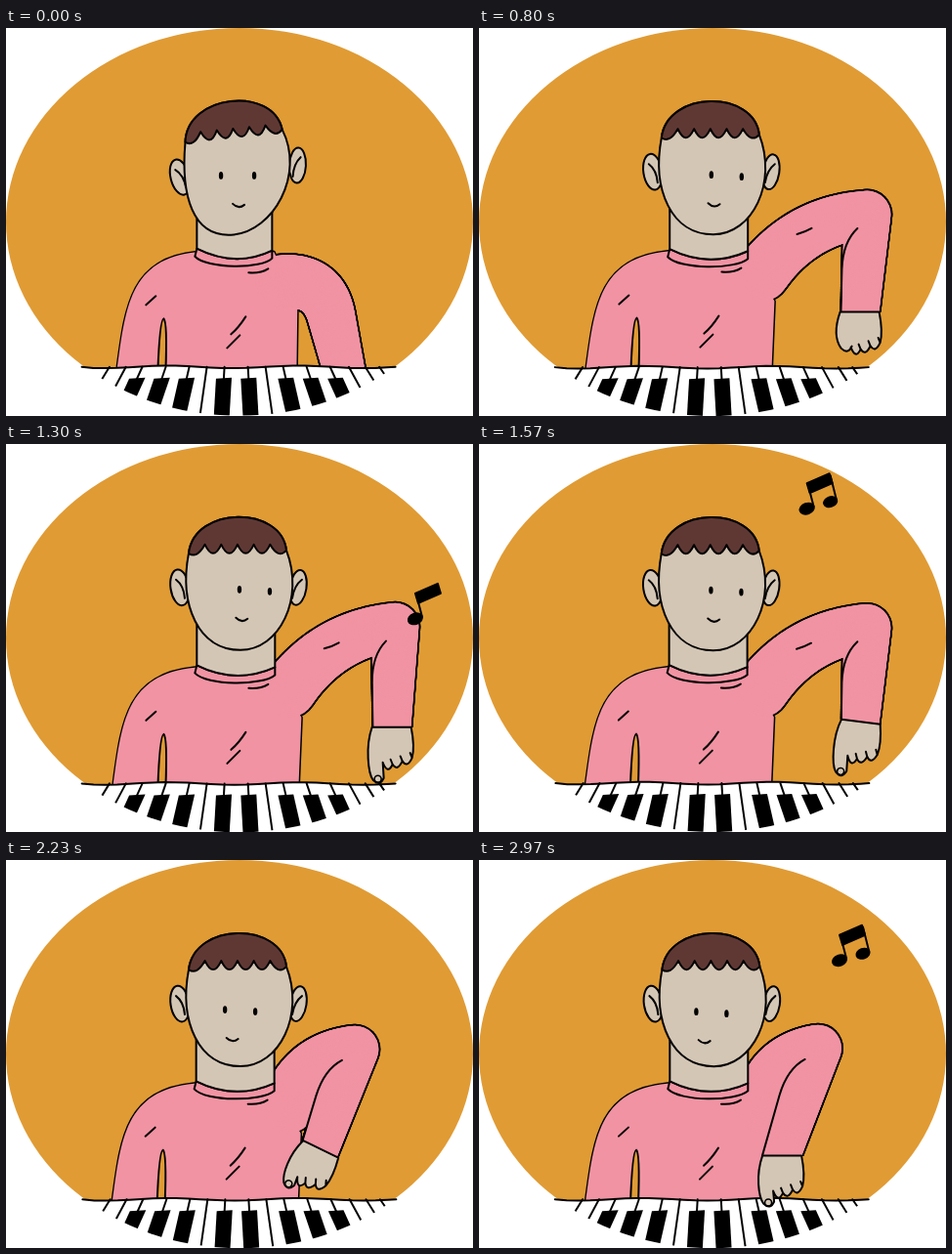
Write an HTML page with a canvas that moves like this. It is 478x397 px and loops after 3.01 s.

```html
<!DOCTYPE html>
<html lang="en">
<head>
<meta charset="utf-8">
<title>Piano player</title>
<style>
html, body { margin: 0; width: 100%; height: 100%; overflow: hidden; background: #fff; }
canvas { display: block; }
</style>
</head>
<body>
<canvas id="stage" width="478" height="397"></canvas>
<script>
const ctx = document.getElementById('stage').getContext('2d');
const LOOP = 3010, STEP = LOOP / 90;
const INK = '#000', PINK = '#f193a3', SKIN = '#d4c6b5', HAIR = '#5f3834', WALL = '#e09b34';

const mix = (a, b, k) => a + (b - a) * k;
const smooth = k => k * k * (3 - 2 * k);
const clamp = k => Math.max(0, Math.min(1, k));

// each pose is reached between the times from and to
const poses = [
  { from: 0, to: 0, elbow: [333, 296], wrist: [355, 390], turn: 0, reach: 0, look: [220, 151] },
  { from: 0, to: 330, elbow: [397, 198], wrist: [381, 294], turn: .1, reach: 0, look: [237, 149] },
  { from: 330, to: 600, elbow: [397, 191], wrist: [390, 291], turn: 0, reach: 0, look: [238, 150] },
  { from: 800, to: 1250, elbow: [398, 187], wrist: [395, 290], turn: 0, reach: 1, look: [239, 149] },
  { from: 1480, to: 1840, elbow: [395, 195], wrist: [369, 257], turn: .8, reach: 1, look: [231, 151] },
  { from: 1840, to: 2240, elbow: [357, 194], wrist: [321, 297], turn: .45, reach: .6, look: [224, 153] },
  { from: 2240, to: 2740, elbow: [347, 193], wrist: [310, 303], turn: 0, reach: .7, look: [222, 155] }
];

function poseAt(t) {
  const i = Math.max(1, poses.findLastIndex(p => p.from <= t));
  const a = poses[i - 1], b = poses[i], k = smooth(clamp((t - b.from) / (b.to - b.from)));
  const blend = (x, y) => Array.isArray(x) ? x.map((v, j) => mix(v, y[j], k)) : mix(x, y, k);
  return Object.fromEntries(Object.keys(a).map(key => [key, blend(a[key], b[key])]));
}

function shape(d, fill, line = 2) {
  const path = new Path2D(d);
  if (fill) { ctx.fillStyle = fill; ctx.fill(path); }
  if (line) { ctx.lineWidth = line; ctx.stroke(path); }
}

function oval(x, y, rx, ry, tilt, fill, line) {
  ctx.beginPath();
  ctx.ellipse(x, y, rx, ry, tilt, 0, 7);
  if (fill) { ctx.fillStyle = fill; ctx.fill(); }
  if (line) { ctx.lineWidth = line; ctx.stroke(); }
}

// draws one part with its own hand-drawn tremble
function part(seed, frame, paint) {
  ctx.save();
  ctx.translate(.4 * Math.sin(frame * 5 + seed), .4 * Math.sin(frame * 3 + seed * 2));
  paint();
  ctx.restore();
}

// a round limb that tapers from r0 to r1 along a curve
function limb(at, r0, r1, grow, color) {
  for (let i = 0; i <= 60; i++) oval(...at(i / 60), ...Array(2).fill(mix(r0, r1, i / 60) + grow), 0, color);
}

function drawBody({ elbow, wrist, turn }, t, k) {
  const sx = mix(283, 289, k), sy = mix(260, 252, k), [ex, ey] = elbow, [wx, wy] = wrist;
  const len = Math.hypot(ex - sx, ey - sy), bulge = 28;
  const cx = (sx + ex) / 2 + (ey - sy) / len * bulge, cy = (sy + ey) / 2 - (ex - sx) / len * bulge;
  const upper = s => [mix(mix(sx, cx, s), mix(cx, ex, s), s), mix(mix(sy, cy, s), mix(cy, ey, s), s)];
  const fore = s => [mix(ex, wx, s), mix(ey, wy, s)];

  function arm(grow, color) {
    limb(upper, 29, 25, grow, color);
    ctx.save();
    ctx.translate(wx, wy);
    ctx.rotate(turn);
    const cuff = new Path2D('M-400 -400H400V0H-400Z'), m = ctx.getTransform();
    ctx.clip(cuff);
    ctx.setTransform(m.translate(0, 0).rotate(-turn * 180 / Math.PI).translate(-wx, -wy));
    limb(fore, 25, 20, grow, color);
    ctx.restore();
  }

  const x = mix(4, 0, k);
  const torso = `M${193 + x / 2} 229C${122 + x} 236 ${118 + x} 285 ${109 + x} 352H${mix(297, 299, k)}L${mix(298, 302, k)} 280L274 229Z`;
  arm(1, INK);
  shape(torso, PINK, 3);
  shape(torso, PINK, 0);
  arm(-1, PINK);
  shape('M155 352Q157 298 161 297Q165 300 163 352', WALL);
  shape('M143 283L153 274M226 327L239 314M230 313Q238 306 245 295M248 250Q260 251 268 246');

  if (k < .5) return;
  // fold of the elbow and the inner edge of the forearm
  const fl = Math.hypot(wx - ex, wy - ey), dx = (wx - ex) / fl, dy = (wy - ey) / fl;
  const spot = (side, down) => `${ex - dy * side + dx * down} ${ey + dx * side + dy * down}`;
  const c = Math.cos(turn), s = Math.sin(turn);
  shape(`M${spot(9, 15)}Q${spot(23, 30)} ${spot(22, 58)}L${wx - 20 * c} ${wy - 20 * s}`);
  if (t < 2000) {
    const [mx, my] = upper(.5);
    shape(`M${mx - 11} ${my + 2}Q${mx - 3} ${my} ${mx + 4} ${my - 4}`);
  }
}

function drawNeck(k) {
  const r = mix(272, 275, k);
  shape(`M195 226Q235 246 ${r} 228V236C262 247 205 247 193 234Z`, PINK);
  shape(`M195 180V226Q235 246 ${r} 228V180`, SKIN);
}

function drawHead([lookX, lookY], k) {
  const chin = mix(227, 240, k);
  const top = '287 109C282 63 193 63 187 112';
  ctx.save();
  ctx.translate(235, 150);
  ctx.rotate(mix(-.1, 0, k));
  ctx.translate(-235, -150);
  oval(178, 147, 9.5, 18.5, -.15, SKIN, 2);
  oval(299, 147, 8.5, 18, .15, SKIN, 2);
  shape('M174 139Q182 145 183 158M303 139Q295 145 293 158');
  shape(`M${top}C177 165 ${chin - 43} 211 ${chin} 211C${chin + 40} 211 306 158 287 109Z`, SKIN);
  let fringe = 'M' + top;
  for (let i = 1; i <= 6; i++) {
    const x = 187 + i * 100 / 6;
    fringe += `Q${x - 8.3} ${i % 5 === 1 ? 118 : 121} ${x} ${i < 6 ? 103 : 109}`;
  }
  shape(fringe, HAIR);
  ctx.restore();

  oval(lookX, lookY, 2.2, 3.9, 0, INK);
  oval(lookX + mix(34, 31, k), lookY + 2 * k, 2.2, 3.9, 0, INK);
  const x = 86 + .65 * lookX + 9 * (1 - k), y = lookY + 30;
  shape(`M${x - 6} ${y - 1}Q${x} ${y + 5} ${x + 6} ${y}`);
}

function drawHand({ wrist, turn, reach }) {
  const tip = mix(40, 57, reach);
  let d = `M20 0H-20C-27 20 -24 ${tip - 10} -19 ${tip - 3}Q-12 ${tip + 4} -8 ${tip - 5}L-9 36`;
  for (const x of [-9, 1, 11]) d += `Q${x + 5} ${46 - x / 3} ${x + 10} ${35 - x / 3}l-2 -5l2 5`;
  ctx.save();
  ctx.translate(...wrist);
  ctx.rotate(turn);
  shape(d + 'Q24 20 20 0Z', SKIN);
  if (reach > .5) oval(-14, tip - 4, 3.5, 3.5, 0, null, 1.6);
  ctx.restore();
}

function clipStage() {
  ctx.beginPath();
  ctx.ellipse(239, 198.5, 239, 198.5, 0, 0, 7);
  ctx.clip();
}

function drawPiano() {
  let top = 'M78 347';
  for (let x = 90; x < 399; x += 12) top += `L${x} ${347 + 1.3 * Math.sin(x)}`;
  shape(top + 'L399 347V420H78Z', '#fff', 0);
  shape(top + 'L399 347');

  // keys stand in slots that fan out towards the viewer
  const fan = (slot, y, dx = 0) => {
    const x = 134 + 25.5 * slot;
    return `${236 + (x - 236) * (1 + .165 * (y - 360) / 37) + dx} ${y}`;
  };
  ctx.save();
  clipStage();
  for (const slot of [0, 1, 2, 3.5, 4.5, 6, 7, 8]) {
    shape(`M${fan(slot, 347)}L${fan(slot, 360)}`);
    shape(`M${fan(slot, 359, -8)}L${fan(slot, 358, 8)}L${fan(slot, 397, 8)}L${fan(slot, 397, -8)}Z`, INK, 0);
  }
  for (const slot of [-1.4, -.7, 2.75, 5.25, 8.8, 9.5, 10.1]) shape(`M${fan(slot, 347)}L${fan(slot, 397)}`);
  ctx.restore();
}

function drawNote(age) {
  if (age < 30 || age > 400) return;
  const s = (age - 40) / 360;
  ctx.save();
  clipStage();
  ctx.translate(50 - 112 * s, 76 - 200 * s + 65 * s * s);
  oval(369, 103, 8.3, 6.2, -.35, INK);
  shape('M376 101L370 78');
  shape('M369 77L392 67L395 77L372 87Z', INK);
  if (age > 75) {
    oval(393, 96, 7.8, 5.8, -.35, INK);
    shape('M399 93L393 69');
  }
  ctx.restore();
}

function draw(now) {
  const frame = Math.floor((now % LOOP + 10) / STEP) % 90;
  const t = frame * STEP, k = smooth(clamp(t / 300)), pose = poseAt(t);
  ctx.fillStyle = '#fff';
  ctx.fillRect(0, 0, 478, 397);
  ctx.strokeStyle = INK;
  ctx.lineCap = ctx.lineJoin = 'round';
  oval(239, 198.5, 239, 198.5, 0, WALL);

  const raised = t > 250, hand = () => part(4, frame, () => drawHand(pose));
  part(1, frame, () => drawBody(pose, t, k));
  part(2, frame, () => drawNeck(k));
  part(3, frame, () => drawHead(pose.look, k));
  if (!raised) hand();
  part(5, frame, drawPiano);
  if (raised) hand();
  drawNote(t - 1264);
  drawNote(t - 2776);
}

let start;
function tick(now) {
  start ??= now;
  draw(now - start);
  requestAnimationFrame(tick);
}
draw(0);
requestAnimationFrame(tick);
</script>
</body>
</html>
```
